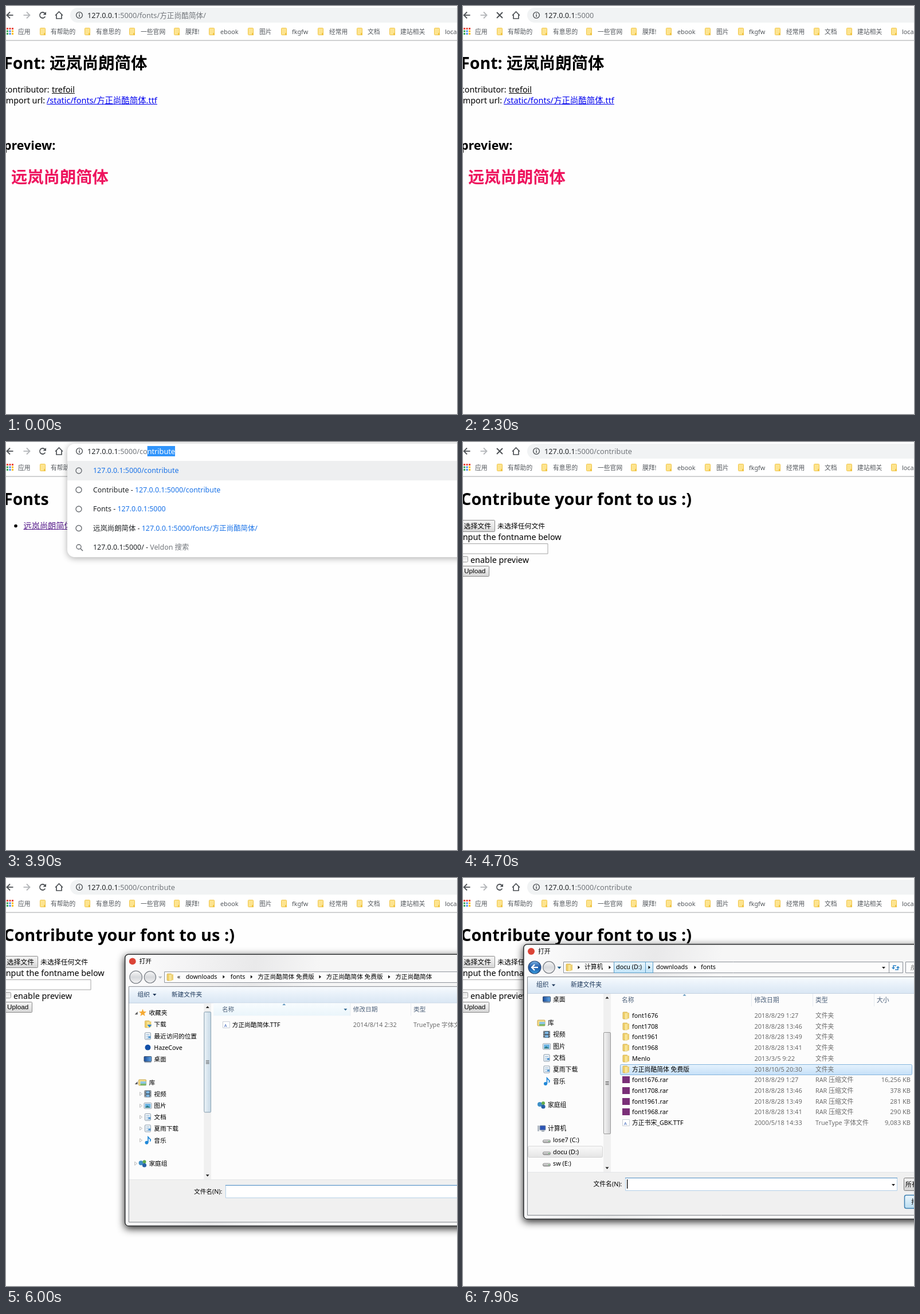
These frames come from a looping animation (787 by 712 pixels, 8000 ms). An HTML page with a canvas:

```html
<!DOCTYPE html>
<html lang="zh">
<head>
<meta charset="utf-8">
<title>Font upload</title>
<style>
html, body { margin: 0; width: 100%; height: 100%; overflow: hidden; background: #fefefe; }
canvas { display: block; }
</style>
</head>
<body>
<canvas id="stage" width="787" height="712"></canvas>
<script>
const g = document.getElementById('stage').getContext('2d');
const W = 787, H = 712, LOOP = 8000;
const SANS = '"Noto Sans", "Noto Sans CJK SC", "Noto Sans CJK JP", sans-serif';
const ARIAL = '"Liberation Sans", sans-serif';
const CJK = '"Noto Sans CJK SC", "Noto Sans CJK JP", sans-serif';
const HOST = '127.0.0.1', ROOT = HOST + ':5000';
const FONT_URL = ROOT + '/fonts/方正尚酷简体/';
const FORM_URL = ROOT + '/contribute';
const FONT_TITLE = '远岚尚朗简体';
const FOLDER = '方正尚酷简体 免费版';

// y is the middle of the line; the baseline sits on a whole pixel
const baseline = (y, size) => Math.round(y + size * 0.36);
function text(s, x, y, size, color = '#000', weight = 400, family = SANS) {
  g.font = `${weight} ${size}px ${family}`;
  g.fillStyle = color;
  g.fillText(s, x, baseline(y, size));
  return g.measureText(s).width;
}
function link(s, x, y, size, color) {
  const w = text(s, x, y, size, color);
  rect(x, baseline(y, size) + 1, w, 1, color);
}
function rect(x, y, w, h, fill) {
  g.fillStyle = fill;
  g.fillRect(x, y, w, h);
}
function box(x, y, w, h, r, fill, stroke, lw = 1) {
  g.beginPath();
  g.roundRect(x, y, w, h, r);
  if (fill) { g.fillStyle = fill; g.fill(); }
  if (stroke) { g.strokeStyle = stroke; g.lineWidth = lw; g.stroke(); }
}
function disc(x, y, r, fill, stroke, lw = 1) {
  g.beginPath();
  g.arc(x, y, r, 0, 7);
  if (fill) { g.fillStyle = fill; g.fill(); }
  if (stroke) { g.strokeStyle = stroke; g.lineWidth = lw; g.stroke(); }
}
function line(color, lw, ...p) {
  g.beginPath();
  for (let i = 0; i < p.length; i += 2) g.lineTo(p[i], p[i + 1]);
  g.strokeStyle = color;
  g.lineWidth = lw;
  g.stroke();
}
function poly(fill, ...p) {
  g.beginPath();
  for (let i = 0; i < p.length; i += 2) g.lineTo(p[i], p[i + 1]);
  g.fillStyle = fill;
  g.fill();
}
function fade(x0, y0, x1, y1, ...colors) {
  const f = g.createLinearGradient(x0, y0, x1, y1);
  colors.forEach((c, i) => f.addColorStop(i / (colors.length - 1), c));
  return f;
}
const downTri = (x, y, r = 3, c = '#222') => poly(c, x - r, y - r / 2, x + r, y - r / 2, x, y + r / 2 + 0.5);
const rightTri = (x, y) => poly('#111', x - 1.5, y - 3, x + 2, y, x - 1.5, y + 3);

/* ---------- browser ---------- */
const MARKS = [[59, 78, '有帮助的'], [137, 157, '有意思的'], [215, 235, '一些官网'], [293, 313, '膜拜!'],
  [354, 374, 'ebook'], [422, 442, '图片'], [480, 499, 'fkgfw'], [544, 564, '经常用'],
  [612, 631, '文档'], [669, 688, '建站相关'], [747, 766, 'local']];

function arrow(x, dir, color) {
  line(color, 1.8, x - 5.5 * dir, 16, x + 5.5 * dir, 16);
  line(color, 1.8, x, 10.5, x + 5.5 * dir, 16, x, 21.5);
}
function toolbar(loading) {
  const ink = '#4e5256';
  rect(0, 0, W, 60, '#fff');
  arrow(7, -1, ink);
  arrow(36, 1, '#b4b6b9');
  if (loading) {
    line(ink, 1.9, 59, 11, 69, 21);
    line(ink, 1.9, 69, 11, 59, 21);
  } else {
    g.beginPath();
    g.arc(64, 16, 5, 0.5, 5.6);
    g.strokeStyle = ink; g.lineWidth = 1.8; g.stroke();
    poly(ink, 70, 10, 70, 15.5, 64.5, 15.5);
  }
  line(ink, 1.7, 86, 16.5, 92.5, 10, 99, 16.5);
  line(ink, 1.7, 88, 15, 88, 22, 97, 22, 97, 15);

  const dots = ['#ea4335', '#ea4335', '#ea4335', '#34a853', '#4285f4', '#fbbc05', '#34a853', '#4285f4', '#fbbc05'];
  dots.forEach((c, i) => rect(1 + i % 3 * 4.5, 38 + Math.floor(i / 3) * 4.5, 3, 3, c));
  text('应用', 21, 45, 10.8, '#54585d');
  for (const [ix, tx, name] of MARKS) {
    box(ix + 0.5, 38.5, 9, 12, 1, '#fde48f', '#f0c548');
    rect(ix + 7, 47, 3, 4, '#f0c548');
    text(name, tx, 45, 10.8, '#54585d');
  }
  rect(0, 59, W, 1, '#d8d9da');
  rect(0, 60, W, 1, '#c8c9ca');
}
function omnibox({ url, focus, sel = -1, caret, drop }) {
  if (drop) suggestions(drop);
  else if (focus) box(112, 4, 720, 24, 12, '#fff', '#a9c7f6', 2);
  else box(112, 3, 720, 26, 13, '#f1f3f4');
  disc(128, 16, 5.4, null, '#4e5256', 1.4);
  rect(127.3, 15, 1.5, 4, '#4e5256');
  rect(127.3, 12.6, 1.5, 1.5, '#4e5256');

  const size = 12.7, x = 142;
  const w = text(HOST, x, 16, size, '#222528');
  text(url.slice(HOST.length), x + w, 16, size, '#73777c');
  const end = x + g.measureText(url).width;
  if (sel >= 0 && sel < url.length) {
    const sx = x + g.measureText(url.slice(0, sel)).width;
    rect(sx, 7, end - sx, 18, '#3094fb');
    text(url.slice(sel), sx, 16, size, '#fff');
  } else if (caret) rect(Math.round(end), 8, 1, 16, '#222');
}
function suggestions(rows) {
  g.save();
  g.shadowColor = 'rgba(0,0,0,.32)';
  g.shadowBlur = 12;
  g.shadowOffsetY = 2;
  box(107, 3, 720, 198, 13, '#fff');
  g.restore();
  rect(107, 33, W, 34, '#eeeff0');
  rows.forEach(([title, url], i) => {
    const y = 50 + i * 33.5, last = i === rows.length - 1;
    disc(127, y - (last ? 1 : 0), last ? 4 : 5, null, '#6a6e73', 1.4);
    if (last) line('#6a6e73', 1.6, 130, y + 2, 134, y + 6);
    const w = title ? text(title + ' - ', 152, y, 12.4, '#222528') : 0;
    text(url, 152 + w, y, 12.4, last ? '#73777c' : '#1a73e8');
  });
}
const dropRows = first => [
  ['', first],
  ['Contribute', FORM_URL],
  ['Fonts', ROOT],
  [FONT_TITLE, FONT_URL],
  [ROOT + '/', 'Veldon 搜索']
];

/* ---------- pages ---------- */
const heading = (s, x, size, family) => text(s, x, 99.5, size, '#000', 700, family);

function fontPage() {
  heading('Font:', -4, 28.6);
  heading(FONT_TITLE, 76, 28.4, CJK);
  text('contributor:', -4, 146, 14.2);
  link('trefoil', 80, 146, 14.4, '#000');
  text('import url:', -4, 165, 14.4);
  link('/static/fonts/方正尚酷简体.ttf', 71, 165, 14.45, '#0000ee');
  text('preview:', -4, 243, 21.4, '#000', 700);
  text(FONT_TITLE, 9, 299, 28.3, '#ee145e', 900, CJK);
}
function listPage() {
  heading('Fonts', -4, 28.5);
  disc(17, 146.5, 2.8, '#000');
  link(FONT_TITLE, 30.5, 146, 14.2, '#551a8b');
}
function button(y, w, h) {
  box(-6.5, y + 0.5, w + 6, h, 1, fade(0, y, 0, y + h, '#f4f4f4', '#e9e9e9', '#d6d6d6'), '#8a8a8a');
}
function formPage() {
  heading('Contribute your font to us :)', -4, 28.9);
  button(136, 56, 20);
  text('选择文件', 1.5, 147, 11.9);
  text('未选择任何文件', 60, 147, 11.9);
  text('input the fontname below', -4, 166, 14.4);
  box(-6.5, 177.5, 154.5, 17.5, 0, '#fff', '#a4a4a4');
  box(-3.5, 199.5, 12, 10, 2, fade(0, 199, 0, 210, '#e2e2e2', '#fafafa'), '#9a9a9a');
  text('enable preview', 13, 205.5, 14.4);
  button(216, 46, 18);
  text('Upload', 2, 225, 11.8, '#000', 400, ARIAL);
}

/* ---------- file dialog, local coordinates ---------- */
const DW = 850, DH = 481, UI = 10.8;
const TREE = [['收藏夹', 104, 'star'], ['下载', 124, 'folder'], ['最近访问的位置', 145, 'doc'], ['HazeCove', 165, 'dot'],
  ['桌面', 186, 'screen'], ['库', 227, 'lib'], ['视频', 247, 'film'], ['图片', 268, 'image'], ['文档', 288, 'doc'],
  ['夏雨下载', 308, 'doc'], ['音乐', 329, 'note'], ['家庭组', 370, 'group'], ['计算机', 411, 'pc'],
  ['lose7 (C:)', 431, 'drive'], ['docu (D:)', 452, 'drive'], ['sw (E:)', 472, 'drive']];
const ROOTS = ['star', 'lib', 'group', 'pc'];
const FILES = [['font1676', '2018/8/29 1:27'], ['font1708', '2018/8/28 13:46'], ['font1961', '2018/8/28 13:49'],
  ['font1968', '2018/8/28 13:41'], ['Menlo', '2013/3/5 9:22'], [FOLDER, '2018/10/5 20:30'],
  ['font1676.rar', '2018/8/29 1:27', '16,256'], ['font1708.rar', '2018/8/28 13:46', '378'],
  ['font1961.rar', '2018/8/28 13:49', '281'], ['font1968.rar', '2018/8/28 13:41', '290'],
  ['方正书宋_GBK.TTF', '2000/5/18 14:33', '9,083']];

function folder(x, y) {
  box(x - 5, y - 6, 8, 12, 1, '#efd06c', '#cfa945', 0.8);
  poly(fade(x, 0, x + 6, 0, '#faeaa4', '#e8c661'), x - 1, y - 4, x + 6, y - 5, x + 6, y + 5, x - 1, y + 6.5);
}
const ICONS = {
  folder(x, y) { folder(x, y); poly('#2f86d2', x - 1, y + 1, x + 7, y + 1, x + 3, y + 6); },
  dot(x, y) { disc(x, y, 5, '#1250a8'); },
  star(x, y) {
    const p = [];
    for (let i = 0; i < 10; i++) {
      const a = i * Math.PI / 5 - Math.PI / 2, r = i % 2 ? 3 : 7;
      p.push(x + r * Math.cos(a), y + r * Math.sin(a));
    }
    poly('#f5a934', ...p);
  },
  doc(x, y) {
    box(x - 5, y - 6, 10, 12, 1, '#f5f9fc', '#8798a8');
    for (let i = 0; i < 3; i++) rect(x - 3, y - 3 + i * 3, 6, 1, '#7fa9cd');
    rect(x + 1, y, 4, 4, '#5c9bd1');
  },
  screen(x, y) {
    box(x - 6.5, y - 5, 13, 9, 1, fade(x - 6, y, x + 6, y, '#1d4f9c', '#5fa4e4'), '#3c4d66');
    rect(x - 6, y + 5, 12, 1, '#8795a5');
  },
  lib(x, y) {
    box(x - 7, y - 5, 13, 10, 1, '#f5dc86', '#c9a64c');
    rect(x - 4, y - 2, 10, 7, '#8fc6e6');
    rect(x - 4, y + 2, 10, 3, '#79b86a');
  },
  film(x, y) {
    box(x - 6, y - 6, 12, 12, 1, '#3b4650');
    rect(x - 3, y - 5, 6, 4.5, '#7fb7e2');
    rect(x - 3, y + 1, 6, 4.5, '#7fb7e2');
    for (let i = 0; i < 4; i++) {
      rect(x - 5.3, y - 5 + i * 3, 1.5, 1.5, '#fff');
      rect(x + 4, y - 5 + i * 3, 1.5, 1.5, '#fff');
    }
  },
  image(x, y) {
    box(x - 6.5, y - 5, 13, 10, 1, '#fff', '#8a9aaa');
    rect(x - 5, y - 3.5, 10, 7, '#6ab2e2');
    poly('#2e7c86', x - 5, y + 3.5, x - 1, y - 0.5, x + 5, y + 3.5);
  },
  note(x, y) {
    disc(x - 2, y + 4, 3, '#2088d8');
    line('#2088d8', 1.7, x + 0.5, y + 4, x + 0.5, y - 6, x + 5, y - 1, x + 4, y + 2);
  },
  group(x, y) {
    disc(x - 3, y - 1, 4, '#3d8fc7');
    disc(x + 3, y - 3, 3, '#62ac4e');
    disc(x + 3, y + 3, 3.6, '#2861a6');
  },
  pc(x, y) {
    rect(x - 7, y - 5, 3, 10, '#b4bcc5');
    box(x - 3, y - 5, 10, 8, 1, '#2d55b5', '#8d99a6');
    rect(x, y + 4, 5, 1.5, '#8d99a6');
  },
  drive(x, y) {
    box(x - 6.5, y, 13, 5, 2, fade(0, y, 0, y + 5, '#e9e9e9', '#9c9c9c'), '#777', 0.8);
    rect(x + 3, y + 2, 2, 1, '#3fae49');
  }
};

function navButton(x, r, active) {
  disc(x, 41, r, active ? fade(0, 30, 0, 52, '#7fb6e6', '#1a55a5', '#3aa0e0') : fade(0, 30, 0, 52, '#fafafa', '#d7d9dc', '#f4f4f4'),
    active ? '#2a4a78' : '#7b8087', 1.2);
  if (!active) return;
  line('#fff', 2.4, x - 5, 41, x + 6, 41);
  line('#fff', 2.4, x, 36, x - 5, 41, x, 46);
}
function pathBar(up) {
  navButton(20, 11, up);
  navButton(45, 10.3, false);
  downTri(63, 41.5, 3.5, up ? '#1c5a86' : '#b7bcc2');
  box(70.5, 31.5, 592, 19, 0, '#fcfcfc', '#8a9098');
  folder(80, 41);
  const name = (s, x) => text(s, x, 40.5, UI);
  if (up) {
    box(158.5, 31.5, 68, 19, 0, fade(0, 31, 0, 51, '#eaf6fd', '#bfe3f8'), '#5a9bc4');
    line('#5a9bc4', 1, 213.5, 32, 213.5, 50);
    [97, 151, 220, 300].forEach(x => rightTri(x, 41));
    name('计算机', 107); name('docu (D:)', 162); name('downloads', 232); name('fonts', 310);
  } else {
    [175, 224, 345, 467].forEach(x => rightTri(x, 40.5));
    name('«', 93); name('downloads', 108); name('fonts', 187);
    name(FOLDER, 235); name(FOLDER, 356); name('方正尚酷简体', 478);
  }
  downTri(629, 41.5);
  line('#8a9098', 1, 638.5, 32, 638.5, 50);
  line('#2f86c9', 1.6, 646, 42, 646, 38, 651, 38);
  poly('#2f86c9', 643, 41, 649, 41, 646, 44.5);
  line('#2f86c9', 1.6, 649, 45, 654, 45, 654, 41);
  poly('#2f86c9', 651, 42, 657, 42, 654, 38.5);
  box(667.5, 31.5, 170, 19, 0, '#fcfcfc', '#8a9098');
  text('搜索 fonts', 675, 41, UI, '#777', '400 italic');
}
function tree(up, hover) {
  g.save();
  g.beginPath();
  g.rect(7, 87, 133, 311);
  g.clip();
  const dy = up ? -89 : 0;
  if (up) box(8.5, 353, 130, 19.5, 2, fade(0, 353, 0, 372, '#fafafa', '#e5e5e5'), '#d5d5d5');
  TREE.forEach(([name, y, icon], i) => {
    const root = ROOTS.includes(icon), open = icon === 'star' || icon === 'lib';
    ICONS[icon](root ? 32 : 41, y + dy);
    text(name, root ? 43 : 52, y + dy, UI);
    if (!hover) return;
    const x = root ? 18 : 27;
    if (open) poly('#555', x, y + 3, x + 5, y + 3, x + 5, y - 2);
    else if (i > 5) line('#bbb', 1, x, y - 3, x + 4, y, x, y + 3, x, y - 3);
  });
  g.restore();
  rect(140, 87, 13, 311, '#f0f0f0');
  const ty = up ? 154 : 102;
  box(140.5, ty + 0.5, 12, 177, 1.5,
    hover ? fade(140, 0, 153, 0, '#eef5f9', '#c3d6e4') : fade(140, 0, 153, 0, '#f6f6f6', '#cfcfd1'), hover ? '#8099ab' : '#999');
  for (let i = 0; i < 3; i++) rect(143.5, ty + 86 + i * 2.5, 6, 1, '#555');
  poly('#222', 143.5, 95.5, 149.5, 95.5, 146.5, 92);
  downTri(146.5, 391);
}
function files(up, hover) {
  rect(153, 87, DW - 160, 311, '#fcfcfc');
  if (hover) {
    rect(157, 87, 241, 22, fade(0, 87, 0, 109, '#f8fcfe', '#eaf5fb'));
    downTri(390, 98, 3, '#3a6e96');
  }
  [398, 505, 612].forEach(x => rect(x, 87, 1, 22, '#e5eaf0'));
  [['名称', 172], ['修改日期', 403.5], ['类型', 510], ['大小', 617]].forEach(([s, x]) => text(s, x, 98.5, UI, '#4c607a'));
  poly('#5f95bd', 278.5, 90.5, 284.5, 90.5, 281.5, 87.5);
  const rows = up ? FILES : [['方正尚酷简体.TTF', '2014/8/14 2:32', '2,284']];
  rows.forEach(([name, date, size], i) => {
    const y = Math.round(125 + i * 18.7), ext = name.split('.')[1];
    if (name === FOLDER) box(169.5, y - 8.5, 509, 18, 2, fade(0, y - 9, 0, y + 9, '#e6f3fd', '#c6e0f8'), '#84b4dd');
    if (!ext) folder(179, y);
    else if (ext === 'rar') rect(173, y - 6, 13, 12, '#7a2f78');
    else {
      box(173.5, y - 5.5, 12, 11, 0, '#fff', '#c9ced6');
      text('A', 176, y + 1, 7.5, '#3a62b8');
    }
    text(name, 190, y, UI);
    text(date, 403.5, y, 11, '#6d6d6d');
    text(!ext ? '文件夹' : ext === 'rar' ? 'RAR 压缩文件' : 'TrueType 字体文件', 510, y, UI, '#6d6d6d');
    if (size) {
      g.textAlign = 'right';
      text(size + ' KB', 676, y, 11, '#6d6d6d');
      g.textAlign = 'left';
    }
  });
}
function dialog(x, y, { scale = 1, alpha = 1, up = false, hover = false }) {
  g.save();
  g.globalAlpha = alpha;
  g.translate(x + DW / 2, y + 220);
  g.scale(scale, scale);
  g.translate(-DW / 2, -220);

  g.save();
  g.shadowColor = 'rgba(0,0,0,.85)';
  g.shadowBlur = 14;
  g.shadowOffsetY = 4;
  box(0, 0, DW, DH, 6, '#f4f5f5');
  g.restore();
  box(0.8, 0.8, DW, DH - 1.6, 6, fade(0, 0, 340, 60, '#fdfdfd', '#f3f3f4', '#e9e9ea', '#f6f6f6'), '#2c2e30', 1.6);
  disc(14, 13, 6, '#db4437');
  text('打开', 26, 13, UI);
  pathBar(up);

  rect(7, 57, DW - 14, 416, '#fcfcfc');
  rect(7, 57, DW - 14, 30, fade(0, 57, 0, 87, '#f8fbfe', '#e7f0f9', '#d9e6f3'));
  rect(7, 86, DW - 14, 1, '#c4d2e2');
  text('组织', 23, 71.5, UI, '#1e395b');
  downTri(53, 72, 3.2, '#1e395b');
  text('新建文件夹', 83, 71.5, UI, '#1e395b');
  tree(up, hover);
  files(up, hover);

  rect(7, 398, DW - 14, 75, '#f0f0f0');
  rect(7, 398, DW - 14, 1, '#e3e5e8');
  text('文件名(N):', 122.5, 419.5, UI);
  box(178.5, 408.5, 474, 22, 0, '#fff', '#b3d0e8');
  rect(178, 408, 475, 1, '#4f8fc4');
  if (!hover) rect(181, 411, 1.3, 16, '#000');
  downTri(646, 420.5);
  box(664.5, 408.5, 130, 22, 2, fade(0, 408, 0, 431, '#f4f4f4', '#d4d4d4'), '#777');
  text('所有文件', 667, 420, UI);
  box(665.5, 438.5, 90, 23, 3, fade(0, 438, 0, 462, '#eef7fc', '#b8dcf0'), '#3c7fb1', 1.5);
  text('打开(O)', 677, 450, UI);
  box(7.5, 57.5, DW - 15, 416, 0, null, '#82878d');
  g.restore();
}

/* ---------- timeline ---------- */
// value of the last [time, value] pair already reached
const at = (t, steps) => steps.reduce((v, [time, next]) => t >= time ? next : v, steps[0][1]);

function addressState(t) {
  if (t < 700) return { url: FONT_URL };
  if (t < 1900) {
    const sel = at(t, [[700, 28], [800, 26], [900, 23], [1000, 19], [1100, 16], [1300, 15]]);
    return { url: FONT_URL, focus: true, sel, caret: true };
  }
  if (t < 2300) return { url: ROOT + '/', focus: true, caret: true, drop: dropRows(ROOT) };
  if (t < 2900) return { url: ROOT };
  if (t < 3700) return { url: ROOT, focus: true, caret: t >= 3000, sel: t >= 3100 && t < 3300 ? 0 : -1 };
  if (t < 4400) {
    const typed = ROOT.length + Math.min(6, 1 + Math.floor((t - 3700) / 100));
    const bare = typed === ROOT.length + 1;
    return { url: bare ? ROOT + '/' : FORM_URL, focus: true, caret: true, sel: bare ? -1 : typed,
      drop: dropRows(bare ? ROOT : FORM_URL) };
  }
  return { url: FORM_URL };
}
function dialogState(t) {
  if (t < 5800) return;
  if (t < 6100) {
    const [scale, alpha] = at(t, [[5800, [0.94, 0.3]], [5900, [0.97, 0.7]], [6000, [0.9885, 1]]]);
    return [202, 130, { scale, alpha, hover: true }];
  }
  const k = Math.min(1, Math.max(0, (t - 6900) / 700)), e = k * k * (3 - 2 * k);
  return [Math.round(202 - 97 * e), Math.round(130 - 15 * e), { up: t >= 7800 }];
}
function draw(t) {
  rect(0, 0, W, H, '#fefefe');
  at(t, [[0, fontPage], [2400, listPage], [4500, formPage]])();
  toolbar((t >= 2300 && t < 2500) || (t >= 4400 && t < 4900));
  omnibox(addressState(t));
  const d = dialogState(t);
  if (d) dialog(...d);
}

const start = performance.now();
function tick() {
  const t = (performance.now() - start) % LOOP;
  draw(Math.floor(t / 100) * 100);
  requestAnimationFrame(tick);
}
tick();
</script>
</body>
</html>
```
